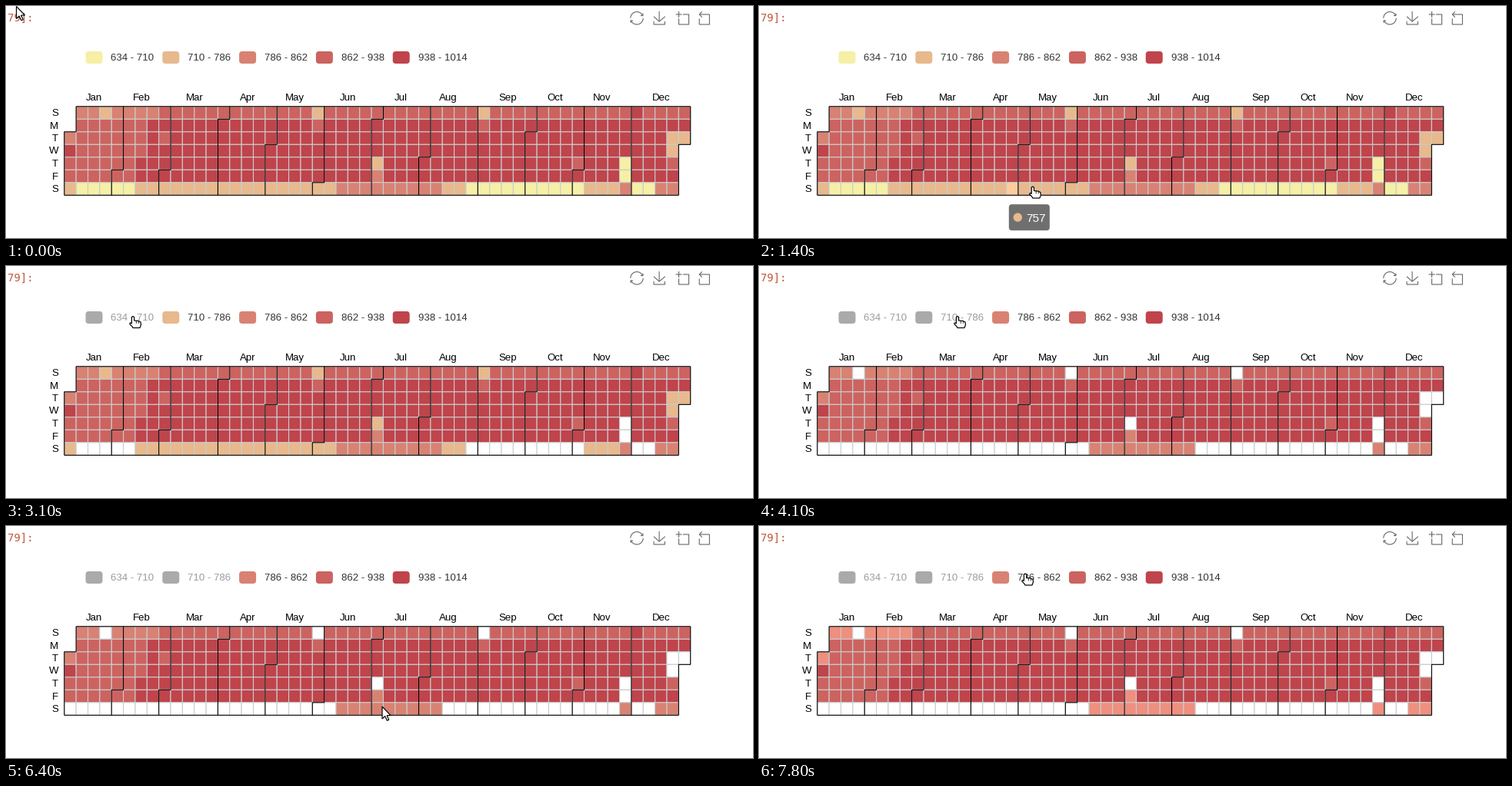
These frames come from a looping animation (971 px wide and 302 px high, 8 s). A matplotlib script:

```python
import matplotlib.pyplot as plt
import numpy as np
from matplotlib.animation import FuncAnimation
from matplotlib.collections import PolyCollection
from matplotlib.patches import Circle, FancyBboxPatch, Polygon

plt.rcParams["path.snap"] = False

WIDTH, HEIGHT, DPI = 971, 302, 64
STEP_MS, STEPS = 100, 80
PX = 72 / DPI  # points per pixel

COLORS = np.array([plt.matplotlib.colors.to_rgb(c) for c in
                   ("#f6efa6", "#e7b98d", "#d88273", "#cc6360", "#bf444c")])
BRIGHT = np.minimum(COLORS * 1.1, 1)
LIMITS = [634 + 76 * i for i in range(6)]
OFF_GRAY, OFF_TEXT = "#aaaaaa", "#9c9c9c"
MONTHS = dict(Jan=31, Feb=28, Mar=31, Apr=30, May=31, Jun=30,
              Jul=31, Aug=31, Sep=30, Oct=31, Nov=30, Dec=31)
FIRST_WEEKDAY = 2

# values on consecutive days from each date
HOLIDAYS = {"Jan 1": [820, 960], "Jan 20": [745, 900], "Feb 26": [900],
            "May 26": [745, 900], "Jul 4": [745, 820], "Sep 1": [745, 900],
            "Oct 31": [900], "Nov 28": [660, 660], "Dec 1": [960],
            "Dec 24": [750, 750, 900], "Dec 31": [750]}

# Saturday curve: week, value
SATURDAYS = np.array([(0, 712), (1, 690), (22.5, 786), (27, 831), (31.5, 786),
                      (33.5, 710), (38, 650), (43.5, 710), (46.5, 786),
                      (47, 800), (48, 650), (49, 690), (50, 800), (51, 830)])

# pointer moves: first step, last step, x, y
START = (13.5, 0.5)
MOVES = [(1, 7, 324, 170), (7, 10, 272, 236), (11, 19, 537, 233),
         (19, 24, 173, 85), (27, 28, 165, 65.5), (34, 37, 258, 65.5),
         (43, 47, 350, 66), (55, 56, 466, 284), (56, 60, 489, 235),
         (64, 72, 402, 117), (72, 78, 346, 62)]


def pointer(t):
    pos = np.array(START)
    for first, last, *goal in MOVES:
        u = np.clip((t - first) / (last - first), 0, 1)
        pos = pos + (np.array(goal) - pos) * u * u * (3 - 2 * u)
    return pos


def slot(date):
    """Position of a date, counted in days from the first Sunday column."""
    month, day = date.split()
    names = list(MONTHS)
    before = sum(MONTHS[name] for name in names[:names.index(month)])
    return FIRST_WEEKDAY + before + int(day) - 1


def typical_value(pos):
    week, weekday = divmod(pos, 7)
    if weekday == 6:
        return np.interp(week, *SATURDAYS.T)
    winter_dip = np.clip((61 - pos) * 2, 0, 60)
    return (885 if weekday == 0 else 969) - winter_dip


X0, Y0, CELL_W, CELL_H = 75.8, 130.8, 15.357, 16.5


def col_x(col):
    return X0 + CELL_W * col


def row_y(row):
    return Y0 + CELL_H * row


fig = plt.figure(figsize=(WIDTH / DPI, HEIGHT / DPI), dpi=DPI, facecolor="white")
ax = fig.add_axes([0, 0, 1, 1])
ax.set_xlim(0, WIDTH)
ax.set_ylim(HEIGHT, 0)
ax.axis("off")


def label(x, y, text, size=13.2, color="black", ha="left",
          font="Liberation Sans", z=4):
    return ax.text(x, y, text, fontsize=size * PX, color=color, ha=ha,
                   va="baseline", family=font, zorder=z)


def line(points, color="black", width=1.1):
    xs, ys = zip(*points)
    ax.plot(xs, ys, color=color, lw=width * PX, zorder=3,
            solid_joinstyle="miter", solid_capstyle="butt")


def rounded(x, y, w, h, radius, **style):
    patch = FancyBboxPatch((x, y), w, h, lw=0,
                           boxstyle=f"round,pad=0,rounding_size={radius}", **style)
    return ax.add_patch(patch)


def month_edge(pos):
    col, row = divmod(pos, 7)
    if row == 0:
        line([(col_x(col), row_y(0)), (col_x(col), row_y(7))])
    else:
        line([(col_x(col + 1), row_y(0)), (col_x(col + 1), row_y(row)),
              (col_x(col), row_y(row)), (col_x(col), row_y(7))])


def icon(left, *strokes):
    scale = 17 / 58
    for stroke in strokes:
        line([(left + scale * u, 7 + scale * v) for u, v in stroke], "#666666")


def arc(start, stop):
    angles = np.radians(np.linspace(start, stop, 30))
    return [(30 + 28 * np.cos(a), 30 + 28 * np.sin(a)) for a in angles]


# calendar cells
days = range(FIRST_WEEKDAY, FIRST_WEEKDAY + 365)
values = {pos: typical_value(pos) for pos in days}
for date, special in HOLIDAYS.items():
    for offset, value in enumerate(special):
        values[slot(date) + offset] = value
bands = {pos: int((v - LIMITS[0]) // 76) for pos, v in values.items()}
cell_bands = np.array([bands[pos] for pos in days])
corners = [(0, 0), (1, 0), (1, 1), (0, 1)]
squares = [[(col_x(pos // 7 + i), row_y(pos % 7 + j)) for i, j in corners]
           for pos in days]
grid = ax.add_collection(PolyCollection(squares, edgecolors="#cccccc",
                                        linewidths=1.1 * PX, zorder=2))

# month borders and labels
first = FIRST_WEEKDAY
for name, length in MONTHS.items():
    month_edge(first)
    middle = (col_x(first // 7) + col_x((first + length - 1) // 7 + 1)) / 2
    label(middle + 0.3, 123, name, ha="center")
    first += length
month_edge(first)
line([(col_x(1), row_y(0)), (col_x(53), row_y(0))])
line([(col_x(0), row_y(7)), (col_x(52), row_y(7))])
for row, letter in enumerate("SMTWTFS"):
    label(68, row_y(row) + 12.2, letter, ha="right")
label(2, 20, "79]:", 14, "#c2593c", font="DejaVu Sans Mono")

# legend
swatches, captions = [], []
for i in range(5):
    left = 103.5 + 99.8 * i
    swatches.append(rounded(left, 59, 22, 16, 4, zorder=3))
    captions.append(label(left + 33, 71, f"{LIMITS[i]} - {LIMITS[i + 1]}"))

# toolbox
icon(811.2, arc(-20, -180), arc(160, 0), [(47, 19), (57, 19), (57, 9)],
     [(13, 41), (3, 41), (3, 51)])
icon(840.6, [(5, 23), (29, 45), (55, 23)], [(29, 45), (29, 0)],
     [(5, 44), (5, 58), (54, 58), (54, 44)])
icon(870.6, [(0, 13.5), (27, 13.5)], [(13.5, 27), (13.5, 0)],
     [(32, 13.5), (58, 13.5), (58, 58), (13.5, 58), (13.5, 32)])
icon(898.3, [(22, 1.4), (10, 13.5), (22, 26)],
     [(10, 13.5), (55, 13.5), (55, 58), (10, 58), (10, 32)])

# tooltip
tip_box = rounded(0, 0, 53, 34, 4, fc="#323232", alpha=0.7, zorder=6)
tip_dot = ax.add_patch(Circle((0, 0), 5.7, lw=0, zorder=7))
tip_text = label(0, 0, "", 15.4, "white", z=7)
tip_parts = (tip_box, tip_dot, tip_text)

# pointers
ARROW = np.array([(0, 0), (0, 16), (3.7, 12.5), (6.3, 18.3), (8.7, 17.2),
                  (6.2, 11.6), (11, 11.5)])
HAND = np.array([(-1.6, 1), (0, 0), (1.6, 1), (1.6, 5.5), (7, 6), (10, 7.5),
                 (10.5, 11), (9, 15), (0, 15), (-1.2, 13), (-4.2, 10),
                 (-3.5, 8.3), (-1.6, 9.4)])
cursor = ax.add_patch(Polygon(ARROW, fc="white", ec="black", lw=1.2 * PX, zorder=9))
knuckles = [ax.plot([], [], color="black", lw=0.8 * PX, zorder=10)[0] for _ in range(2)]


def hovered_day(t, hidden):
    if not (6 <= t <= 22 or 65 <= t <= 71):
        return None
    x, y = pointer(t - 0.6)
    col, row = int((x - X0) // CELL_W), int((y - Y0) // CELL_H)
    pos = 7 * col + row
    if not 0 <= row < 7 or pos not in values or bands[pos] in hidden:
        return None
    return pos


def legend_focus(t):
    spans = [(28, 30), (36, 40), (46, 52), (77, 79)]
    hovered = [i for i, (a, b) in enumerate(spans) if a <= t <= b]
    return min(hovered[0], 2) if hovered else None


def draw(t):
    hidden = {band for band, since in enumerate((31, 41)) if t >= since}
    focus = legend_focus(t)
    pos = hovered_day(t, hidden)

    palette = COLORS.copy()
    if focus is not None:
        palette[focus] = BRIGHT[focus]
    for band in hidden:
        palette[band] = 1
    fills = palette[cell_bands]
    speed = np.hypot(*(pointer(t) - pointer(t - 1)))
    if pos is not None and speed > 15:
        fills[pos - FIRST_WEEKDAY] = BRIGHT[bands[pos]]
    grid.set_facecolor(fills)

    for band, (swatch, caption) in enumerate(zip(swatches, captions)):
        swatch.set_facecolor(OFF_GRAY if band in hidden else COLORS[band])
        caption.set_color(OFF_TEXT if band in hidden else "#333333")

    for part in tip_parts:
        part.set_visible(pos is not None)
    if pos is not None:
        left, top = pointer(t - 1.3) + (22, 22.5)
        tip_box.set_x(left)
        tip_box.set_y(top)
        tip_dot.center = left + 11.5, top + 17
        tip_dot.set_facecolor(COLORS[bands[pos]])
        tip_text.set_position((left + 22, top + 22.5))
        tip_text.set_text(f"{values[pos]:.0f}")

    x, y = pointer(t)
    visible = not 53 <= t < 57
    hand = pos is not None or 28 <= t <= 52 or t >= 77
    cursor.set_xy((HAND if hand else ARROW) + (x, y))
    cursor.set_visible(visible)
    for i, knuckle in enumerate(knuckles):
        kx = x + 4.3 + 3 * i
        knuckle.set_data([kx, kx], [y + 6 + i, y + 9])
        knuckle.set_visible(visible and hand)
    return [grid, cursor, *knuckles, *tip_parts, *swatches, *captions]


anim = FuncAnimation(fig, draw, frames=STEPS, interval=STEP_MS, repeat=True,
                     repeat_delay=0, blit=False)
plt.show()
```
